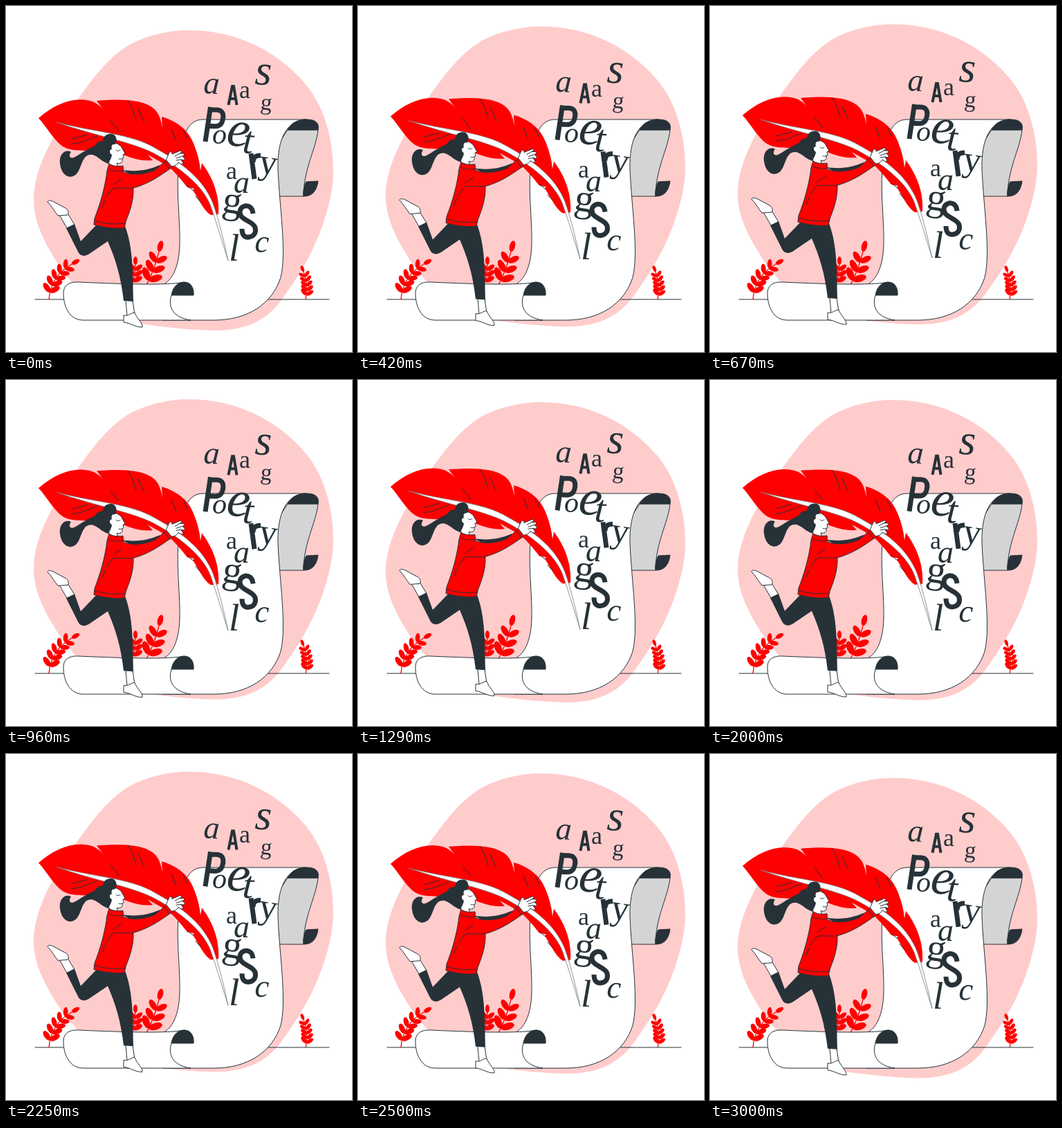
Recreate the animation shown at these times as an HTML page. Size 500 by 500 pixels, loop 3.04 s.

```html
<!DOCTYPE html>
<html lang="en">
<head>
<meta charset="utf-8">
<title>Poetry</title>
<style>
  html, body { margin: 0; width: 100%; height: 100%; overflow: hidden; background: #fff; }
  svg { display: block; width: 100vw; height: 100vh; }
  .line { fill: none; stroke: #263238; stroke-linecap: round; stroke-linejoin: round; }
  .skin { fill: #fff; stroke: #263238; stroke-linejoin: round; }
  .dark { fill: #263238; }
  .red { fill: #f00; }
  .knit { fill: #f00; stroke: #263238; stroke-linejoin: round; }
  .bold { fill: none; stroke: #263238; stroke-width: 7; }
  text { font-family: "Liberation Serif", "Times New Roman", serif; fill: #263238; }
</style>
</head>
<body>
<svg viewBox="0 0 500 500">
  <path id="blob" fill="#fcc" d="M265 35C335 35 400 68 440 122C464 157 473 200 473 240C473 272 460 318 441 356C428 382 413 404 398 425C375 456 345 469 300 469C265 468 225 464 192 459C150 452 105 417 78 377C55 342 40 312 40 280C40 238 65 192 93 150C120 112 145 75 180 55C205 42 235 35 265 35Z"/>
  <path class="line" d="M42 424H467"/>
  <g id="plants"></g>

  <!-- paper -->
  <g stroke="#263238" stroke-linejoin="round">
    <path fill="#d4d4d4" d="M407 179H451C448 207 430 235 430 275H390V205Z"/>
    <path class="dark" d="M434 254L451 253C449 268 442 275 430 275C429 267 431 259 434 254Z"/>
    <path fill="#fff" d="M435 164H285C266 164 258 180 253 205C243 255 252 300 251 345C250 378 240 397 226 403V454H300C350 454 385 430 397 392C406 355 395 290 393 235C392 195 404 164 435 164Z"/>
    <path class="dark" d="M435 164C448 164 453 170 451 179H407C412 169 421 164 435 164Z"/>
    <path fill="#fff" d="M258 399C235 403 195 403 105 399C91 398 83 404 83 415C83 435 92 454 112 454H267C240 450 234 434 239 418Z"/>
    <path class="dark" d="M258 399C268 399 272 409 271 418H239C241 406 248 399 258 399Z"/>
  </g>

  <g id="float">
    <g id="letters"></g>
    <path class="bold" stroke-width="4" style="stroke-width:4" d="M321.5 143L327 116H329L333.5 143M324 134H332"/>
    <path class="bold" d="M295.500 146L288 196M295 150H304C314 150 315 158 313 165C311 174 305 175 292 173"/>
    <path class="bold" d="M354 213L359 250M357 226C357 218 361 216 368 216"/>
    <path class="bold" d="M357 300C356 291 351 288 345 289C338 291 336 298 340 304C346 311 357 312 360 320C362 328 358 333 351 334C344 335 341 330 341 322"/>

    <!-- feather -->
    <path class="red" d="M47 162C72 140 101 130 125 138C134 142 139 147 143 153L131 137C165 134 196 135 212 147C221 154 224 164 226 176L225 160C248 167 264 179 272 201C277 214 280 225 281 238L283 227C299 248 309 274 307 301L296 302C286 296 280 282 270 266L272 264L262 262C254 252 247 243 235 232L205 215L212 223C190 225 170 216 155 208C130 207 98 213 82 203C68 193 60 176 47 162Z"/>
    <path class="line" d="M176 137C183 145 185 155 188 165M191 149L200 168M151 165L163 180M95 199C108 199 120 192 132 188M95 192L118 186M239 178L246 195M256 179L262 192M262 260L271 267M274 275L281 283"/>
    <path fill="#fff" stroke="#777" stroke-width=".8" d="M73 168C130 183 180 184 215 205C255 227 285 250 299 285C308 310 316 345 321 368C312 340 305 315 295 287C283 258 250 232 212 212C180 196 130 188 73 168Z"/>

    <!-- girl -->
    <path class="dark" d="M134 200C120 204 108 214 98 219C92 221 90 216 94 211C86 206 76 214 78 228C80 244 90 249 97 246C108 242 107 225 116 217C122 213 128 215 134 220Z"/>
    <path class="skin" d="M88 321L76 300L88 298L99 316Z"/>
    <path class="skin" d="M60 283C61 280 65 281 69 283L84 291C89 293 92 298 89 302L75 303C70 297 66 289 60 283Z"/>
    <path class="skin" d="M173 425L175 448L186 446L183 425Z"/>
    <path class="skin" d="M170 447C176 449 181 443 186 443C189 452 198 458 197 464C188 465 180 458 170 457Z"/>
    <path class="dark" d="M131 316L108 340L99 315L87 321L104 355C108 363 116 362 122 357L147 340C158 365 166 390 170 426L184 427C183 385 184 350 172 318Z"/>
    <path class="dark" d="M168 237C190 240 206 237 222 230L228 235L190 249Z"/>
    <path class="skin" d="M231 223L235 214C237 209 240 210 240 214L252 209C255 209 254 212 251 213L256 213C259 214 258 216 255 217L258 220C259 223 256 223 253 222L256 227C255 230 252 228 249 226C246 232 242 231 239 232Z"/>
    <path class="line" d="M251 213L244 217M255 217L246 220M253 222L246 223"/>
    <path class="skin" d="M152 196C160 198 166 201 168 206L172 213L169 215L170 219L168 221C169 227 165 228 160 227L162 233L149 231L148 212Z"/>
    <path class="dark" d="M129 211C126 200 132 195 140 195C141 186 148 184 154 185C160 187 161 195 158 200C153 199 152 202 153 207C149 207 149 213 153 215C152 222 149 224 148 228C138 224 131 219 129 211Z"/>
    <path class="line" d="M159 208Q162 211 165 208M163 221Q166 222 169 220" stroke-width=".9"/>
    <path class="knit" d="M149 228C156 232 162 232 169 231L170 240C185 246 203 242 215 237L232 223L240 233C222 246 206 257 184 263C185 283 177 301 173 312L171 321C155 322 140 320 127 316L128 307C137 284 142 264 145 246C145 240 147 234 149 228Z"/>
    <path class="line" d="M148 236C156 239 163 239 170 238M128 310C142 315 157 316 173 314M184 263C174 264 162 262 154 264L145 276M167 250L155 258M229 226L237 236M143 281L139 291"/>
  </g>
</svg>
<script>
const $ = id => document.getElementById(id);

// char, x, baseline, size, tilt in degrees, italic
const letters = [
  ['a', 285, 126, 46, 3, 1], ['a', 337, 133, 36, 0, 0], ['s', 359, 113, 62, 3, 1],
  ['g', 367, 149, 33, 6, 0], ['o', 298, 199, 42, 0, 1], ['e', 317, 200, 74, 8, 1],
  ['t', 341, 212, 56, 4, 1], ['y', 364, 241, 52, 8, 0], ['a', 318, 250, 36, 0, 0],
  ['a', 329, 270, 46, 0, 1], ['g', 311, 297, 56, 8, 0], ['l', 322, 368, 55, 0, 1],
  ['c', 359, 355, 46, 3, 1]
];
$('letters').innerHTML = letters.map(([c, x, y, size, tilt, italic]) =>
  `<text transform="translate(${x} ${y}) rotate(${tilt})" font-size="${size}"` +
  `${italic ? ' font-style="italic"' : ''}>${c}</text>`).join('');

// Leaf pairs along a quadratic stem
function plant([x0, y0], [x1, y1], [x2, y2], pairs, size) {
  const leaf = (x, y, deg, len) =>
    `<ellipse cx="${len / 2}" rx="${len / 2}" ry="${len / 4}" ` +
    `transform="translate(${x} ${y}) rotate(${deg})"/>`;
  let out = `<path d="M${x0} ${y0}Q${x1} ${y1} ${x2} ${y2}" fill="none" stroke="#f00" stroke-width="1.3"/>`;
  for (let i = 0; i <= pairs; i++) {
    const u = 0.16 + 0.84 * i / pairs, v = 1 - u;
    const x = v * v * x0 + 2 * u * v * x1 + u * u * x2;
    const y = v * v * y0 + 2 * u * v * y1 + u * u * y2;
    const deg = Math.atan2(v * (y1 - y0) + u * (y2 - y1), v * (x1 - x0) + u * (x2 - x1)) * 180 / Math.PI;
    const len = size * (1.1 - 0.25 * u);
    out += i < pairs ? leaf(x, y, deg - 48, len) + leaf(x, y, deg + 48, len) : leaf(x, y, deg, len);
  }
  return `<g class="red">${out}</g>`;
}
$('plants').innerHTML =
  plant([62, 424], [65, 390], [95, 373], 5, 15) +
  plant([203, 403], [214, 383], [221, 355], 3, 19) +
  plant([182, 403], [187, 388], [187, 374], 3, 14) +
  plant([433, 424], [438, 405], [430, 384], 5, 11);

// Linear there-and-back, 0 to 1 to 0
const swing = (t, period) => 1 - Math.abs(1 - 2 * (t % period) / period);
const lift = (id, y) => $(id).setAttribute('transform', `translate(0 ${-y})`);

const start = performance.now();
function draw() {
  const t = performance.now() - start;
  lift('blob', 10 * swing(t, 1520));
  lift('float', 9 * swing(t, 3040));
  requestAnimationFrame(draw);
}
draw();
</script>
</body>
</html>
```
